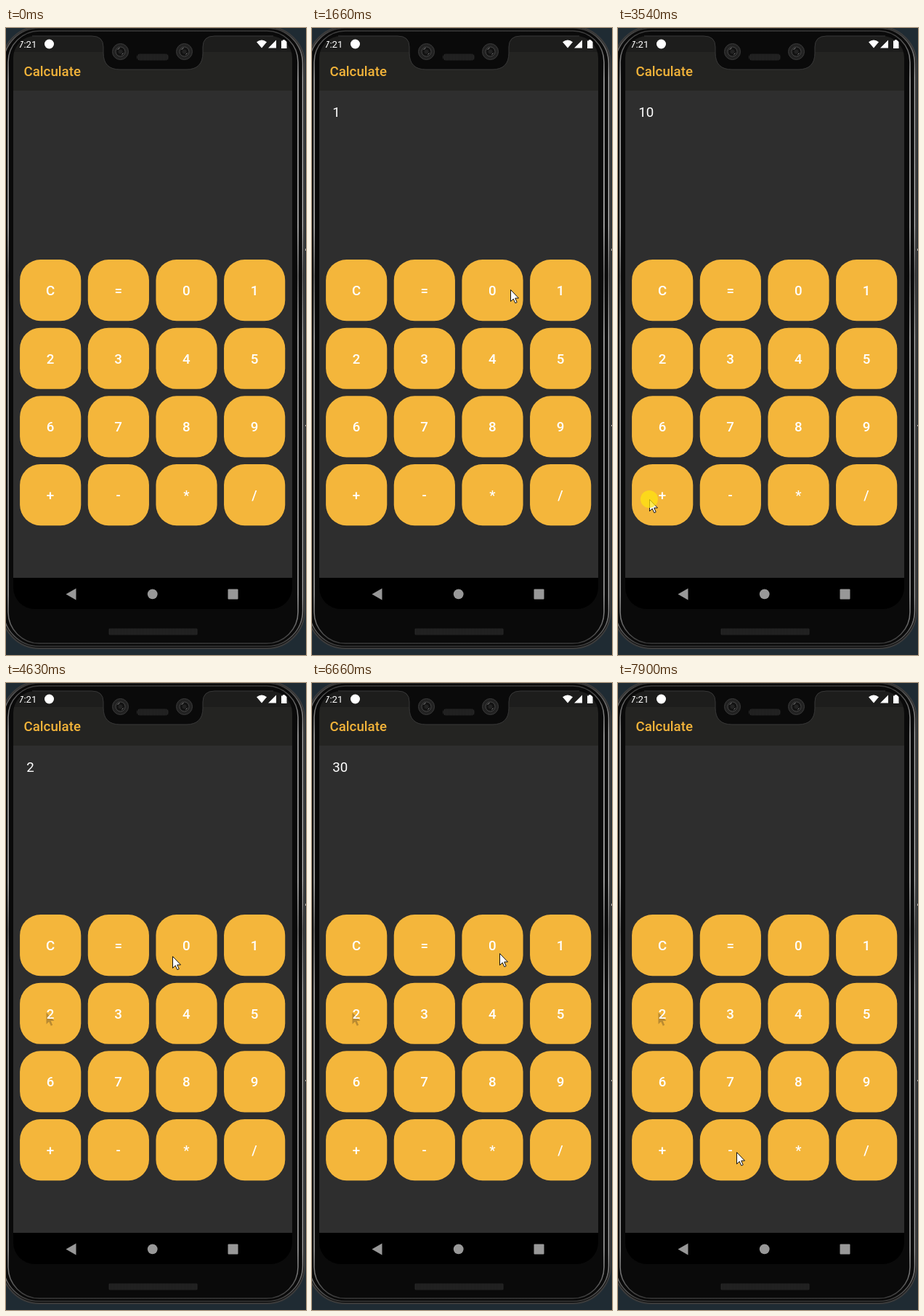
These frames come from a looping animation (413x861 px, 7.99 s). An HTML page:

```html
<!DOCTYPE html>
<html lang="en">
<head>
<meta charset="utf-8">
<title>Calculator</title>
<style>
  html, body { margin: 0; width: 100%; height: 100%; overflow: hidden; background: #1f2b33; }
  svg { display: block; width: 100vw; height: 100vh; }
  text { font-family: Roboto, sans-serif; font-size: 18.7px; fill: #fff; }
  #labels text { font-weight: 500; text-anchor: middle; }
</style>
</head>
<body>
<svg viewBox="0 0 413 861" xmlns="http://www.w3.org/2000/svg">
  <defs>
    <linearGradient id="rim" x1="0" y1="0" x2="0" y2="1">
      <stop offset="0" stop-color="#3a3a3a"/>
      <stop offset=".08" stop-color="#b0b0b0"/>
      <stop offset=".32" stop-color="#c4c4c4"/>
      <stop offset=".4" stop-color="#777"/>
      <stop offset=".5" stop-color="#bbb"/>
      <stop offset=".92" stop-color="#aaa"/>
      <stop offset="1" stop-color="#383838"/>
    </linearGradient>
    <pattern id="mesh" width="2" height="2" patternUnits="userSpaceOnUse">
      <rect width="2" height="2" fill="#151515"/>
      <rect width="1" height="2" fill="#2c2c2c"/>
    </pattern>
    <clipPath id="screen"><rect x="10" y="11" width="384" height="787" rx="30"/></clipPath>
    <path id="arrow" d="M.5 .5V16.5L4.2 13L6.8 18.7L9.2 17.7L6.700 12H11.500Z"/>
    <g id="camera">
      <circle r="11" fill="#222" stroke="#3a3a3a"/>
      <circle r="6.5" fill="#121212" stroke="#444"/>
      <circle r="3" fill="#222"/>
      <path d="M-4 -3L-1 -5M2 4L4 2" stroke="#888"/>
    </g>
  </defs>

  <rect width="413" height="861" fill="#1f2b33"/>
  <path d="M411 303h2v3h-2zM411 545h2v2h-2z" fill="#aaa"/>
  <g fill="#0a0a0a">
    <rect x="-6" y="-2" width="417" height="854" rx="52" stroke="#3c3c3c" stroke-width="2"/>
    <rect x="-3.5" y="0" width="412" height="849" rx="49" stroke="url(#rim)" stroke-width="1.5"/>
    <rect x="3" y="4" width="399" height="841" rx="43" stroke="url(#rim)" stroke-width="1.5"/>
  </g>

  <g clip-path="url(#screen)">
    <rect x="10" y="11" width="384" height="22" fill="#1d1d1c"/>
    <rect x="10" y="33" width="384" height="53" fill="#242422"/>
    <rect x="10" y="86" width="384" height="669" fill="#2e2e2e"/>
    <rect x="10" y="755" width="384" height="43" fill="#000"/>
    <text x="17" y="27" style="font-size:13.2px">7:21</text>
  </g>
  <circle cx="59.5" cy="22" r="6.5" fill="#fff"/>
  <path d="M345 19.2Q352 14 359 19.2L352 27.5ZM361 27.5L372 16.5V27.5ZM379 17.5h2v-1.3h2.6L386.5 19V28H379Z" fill="#fff"/>

  <path d="M36 11H118Q134 11 134 26V34Q134 57 157 57H248Q271 57 271 34V26Q271 11 287 11H368"
        fill="#0a0a0a" stroke="#383838"/>
  <use href="#camera" x="157.500" y="32.5"/>
  <use href="#camera" x="245.5" y="32.5"/>
  <rect x="180" y="35.5" width="44" height="9" rx="4.500" fill="url(#mesh)"/>
  <rect x="141" y="824.5" width="123" height="9" rx="2" fill="url(#mesh)"/>

  <text x="24.5" y="66" style="font-weight:500;fill:#f3b43a">Calculate</text>
  <text id="display" x="28.3" y="122"></text>

  <g id="keys" fill="#f4b63b"></g>
  <use id="smudge" href="#arrow" x="55" y="452" fill="#b98a31"/>
  <g id="labels"></g>

  <g fill="#989898">
    <path d="M82.500 777.500L96.500 769.500V785.500Z"/>
    <circle cx="201.700" cy="777.300" r="6.900"/>
    <rect x="305.500" y="770.500" width="14" height="14" rx="1"/>
  </g>

  <use id="cursor" href="#arrow" fill="#fff" stroke="#111" stroke-linejoin="round"/>
  <circle id="halo" r="12" fill="#ffe40f" opacity=".72"/>
</svg>
<script>
const LOOP = 7990, HOLD = 80;
const KEYS = 'C=0123456789+-*/', PITCH = 93.65, SIZE = 84.2;
const $ = id => document.getElementById(id);

function center(key) {
  const i = KEYS.indexOf(key);
  return { x: 61 + PITCH * (i % 4), y: 360 + PITCH * Math.floor(i / 4) };
}

for (const key of KEYS) {
  const { x, y } = center(key);
  $('keys').innerHTML +=
    `<rect x="${x - SIZE / 2 + .2}" y="${y - SIZE / 2 + .1}" width="${SIZE}" height="${SIZE}" rx="28.5"/>`;
  $('labels').innerHTML += `<text x="${x}" y="${y + 7}">${key}</text>`;
}

// Each stop: the key reached, where on it, the travel time, its bow, and the press if any.
const stops = [
  { key: '1', dx: 0,   dy: 5,  leave: 110,  arrive: 900,  bow: 0,    press: 1040 },
  { key: '0', dx: 25,  dy: -1, leave: 1200, arrive: 1290, bow: 0,    press: 1740 },
  { key: '+', dx: -18, dy: 6,  leave: 2210, arrive: 3230, bow: -.25, press: 3540 },
  { key: '2', dx: -6,  dy: -2, leave: 3640, arrive: 4080, bow: .3,   press: 4250 },
  { key: '0', dx: -10, dy: 4,  leave: 4360, arrive: 4680, bow: .25,  press: 4950 },
  { key: '=', dx: -12, dy: 1,  leave: 5040, arrive: 5120, bow: 0,    press: 5330 },
  { key: '0', dx: 10,  dy: 11, leave: 5870, arrive: 6660, bow: .3 },
  { key: '-', dx: 8,   dy: 3,  leave: 6740, arrive: 7440, bow: -.15, press: 7760 }
];

let spot = { x: 350, y: 850 };
for (const s of stops) {
  const c = center(s.key);
  s.from = spot;
  s.to = spot = { x: c.x + s.dx, y: c.y + s.dy };
}

function pointer(t) {
  const s = stops.findLast(s => t >= s.leave);
  if (!s) return null;
  const u = Math.min(1, (t - s.leave) / (s.arrive - s.leave));
  const e = u * u * (3 - 2 * u);
  const side = 2 * e * (1 - e) * s.bow;
  const w = s.to.x - s.from.x, h = s.to.y - s.from.y;
  return { x: Math.round(s.from.x + w * e - h * side), y: Math.round(s.from.y + h * e + w * side) };
}

// Digits append, an operator stores the number and clears, "=" adds.
function display(t) {
  let text = '', stored = 0;
  for (const { key, press } of stops) {
    if (!(t >= press + HOLD)) continue;
    if (key === '=') {
      text = String(stored + Number(text));
    } else if (/\d/.test(key)) {
      text += key;
    } else {
      stored = Number(text);
      text = '';
    }
  }
  return text;
}

function show(el, on) {
  el.setAttribute('visibility', on ? 'visible' : 'hidden');
}

function draw(t) {
  const pos = pointer(t);
  show($('cursor'), pos);
  show($('halo'), stops.some(s => t >= s.press && t < s.press + HOLD));
  show($('smudge'), t >= 4360);
  if (pos) {
    for (const id of ['cursor', 'halo']) {
      $(id).setAttribute('transform', `translate(${pos.x} ${pos.y})`);
    }
  }
  $('display').textContent = display(t);
}

const begin = performance.now();
function tick(now) {
  draw(Math.max(0, now - begin) % LOOP);
  requestAnimationFrame(tick);
}
draw(0);
requestAnimationFrame(tick);
</script>
</body>
</html>
```
